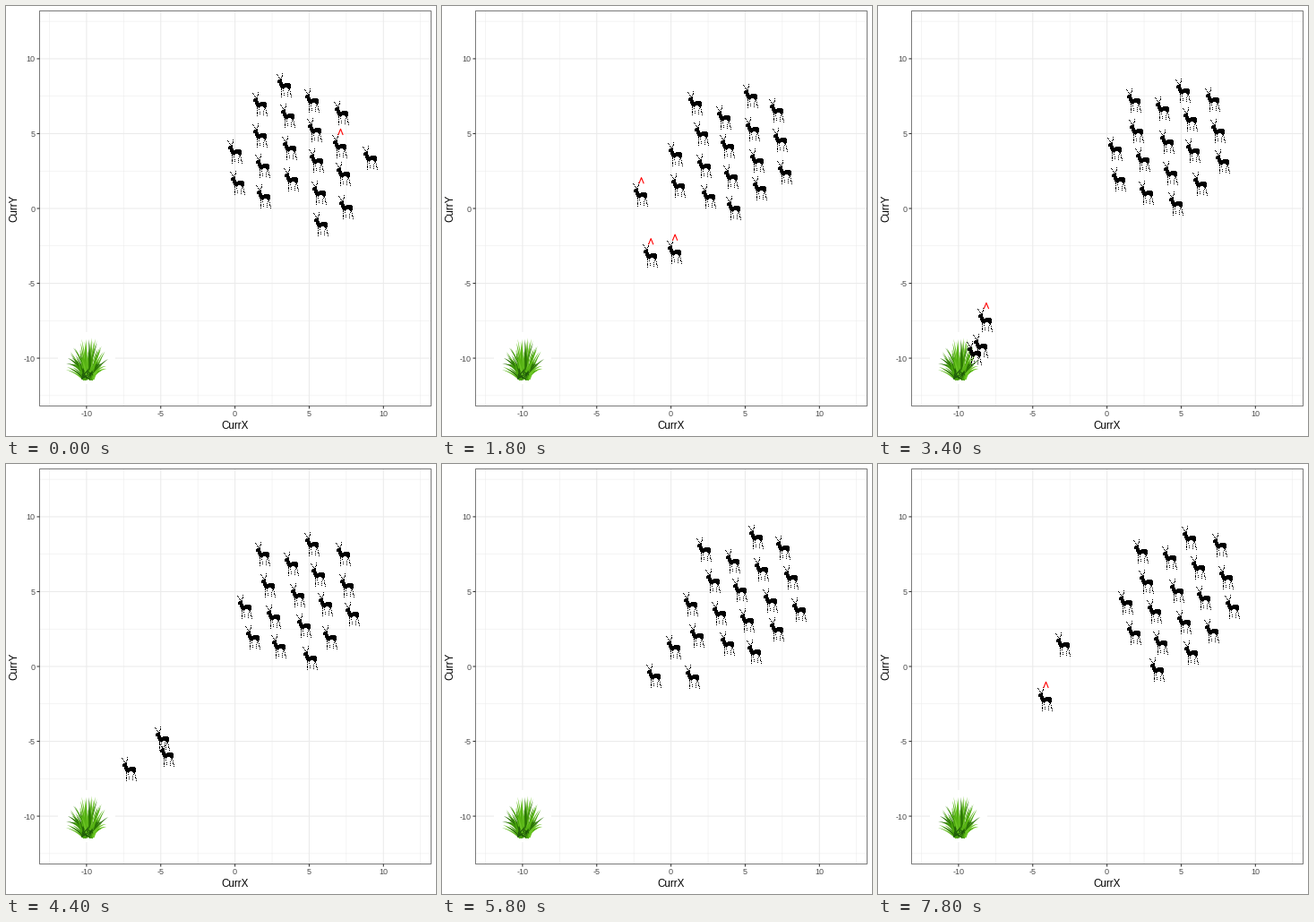
A matplotlib script for the animation above (8000 ms loop, 480 by 480 pixels).

```python
import numpy as np
import matplotlib.pyplot as plt
from matplotlib.animation import FuncAnimation
from matplotlib.collections import LineCollection, PolyCollection
from matplotlib.patches import Rectangle

SIZE, DPI = 480, 80
FRAMES, STEP = 40, 200
PT = 72 / DPI  # points per pixel

plt.rcParams["font.family"] = "Liberation Sans"
fig = plt.figure(figsize=(SIZE / DPI, SIZE / DPI), dpi=DPI, facecolor="white")
ax = fig.add_axes([0, 0, 1, 1])
ax.set_xlim(0, SIZE)
ax.set_ylim(SIZE, 0)
ax.axis("off")

LEFT, TOP, RIGHT, BOTTOM = 37.5, 5.5, 474.5, 446.5


def px(v):
    return 255.6 + 16.57 * v


def py(v):
    return 226.0 - 16.71 * v


def line(x, y, color, width, z):
    ax.plot(x, y, color=color, lw=width * PT, zorder=z,
            solid_capstyle="butt", snap=False)


def label(x, y, text, size, color, **kw):
    ax.text(x, y, text, fontsize=size * PT, color=color, **kw)


def draw_plot():
    for v in np.arange(-12.5, 13, 2.5):
        major = v % 5 == 0
        width = 1.07 if major else 0.53
        line([px(v)] * 2, [TOP, BOTTOM], "#ebebeb", width, 1)
        line([LEFT, RIGHT], [py(v)] * 2, "#ebebeb", width, 1)
        if major:
            line([px(v)] * 2, [BOTTOM, BOTTOM + 3], "#333333", 1.07, 2)
            line([LEFT - 3, LEFT], [py(v)] * 2, "#333333", 1.07, 2)
            label(px(v), 456, f"{v:.0f}", 9, "#4d4d4d",
                  ha="center", va="center")
            label(32.5, py(v), f"{v:.0f}", 9, "#4d4d4d",
                  ha="right", va="center_baseline")
    ax.add_patch(Rectangle((LEFT, TOP), RIGHT - LEFT, BOTTOM - TOP, fill=False,
                           ec="#333333", lw=0.65 * PT, zorder=8, snap=False))
    label(255.8, 472, "CurrX", 11.6, "black", ha="center", va="baseline")
    label(9.5, 226, "CurrY", 11.6, "black", ha="center", va="center",
          rotation=90)


def blade(base, tip, droop, width):
    """Tapered curved leaf as a polygon."""
    base, tip = np.array(base), np.array(tip)
    mid = (base + tip) / 2 + [0, -droop]
    t = np.linspace(0, 1, 9)[:, None]
    curve = (1 - t) ** 2 * base + 2 * t * (1 - t) * mid + t ** 2 * tip
    d = np.gradient(curve, axis=0)
    side = np.c_[-d[:, 1], d[:, 0]] / np.hypot(d[:, 0], d[:, 1])[:, None]
    half = side * width / 2 * (1 - t ** 2)
    return np.r_[curve + half, (curve - half)[::-1]]


def draw_grass():
    rng = np.random.default_rng(4)
    greens = ["#2a7306", "#3d9409", "#4aa80c", "#58b414", "#6cc624"]
    ax.add_patch(Rectangle((58, 364), 64, 58, fc="white", lw=0, zorder=2))
    leaves = []
    for a in np.linspace(-1.5, 1.5, 70):
        reach = rng.uniform(0.45, 1)
        base = (91 + 4 * np.sin(a) + rng.uniform(-3, 3), rng.uniform(407, 418))
        tip = (91 + 25 * reach * np.sin(a), 409 - 41 * reach * np.cos(a))
        leaves.append(blade(base, tip, 4, rng.uniform(1.4, 2.5)))
    rng.shuffle(leaves)
    ax.add_collection(PolyCollection(
        leaves, facecolors=rng.choice(greens, len(leaves)), lw=0, zorder=3))
    roots = [blade((91 + rng.uniform(-7, 7), rng.uniform(411, 417)),
                   (91 + rng.uniform(-8, 8), rng.uniform(403, 411)), 0, 1.4)
             for _ in range(10)]
    ax.add_collection(PolyCollection(roots, facecolors="#1f5a0a", lw=0,
                                     zorder=3))


def stroke(x0, y0, x1, y1, w):
    a, b = np.array([x0, y0], float), np.array([x1, y1], float)
    d = (b - a) / np.hypot(*(b - a))
    n = np.array([-d[1], d[0]]) * w / 2
    return np.array([a + n, b + n, b - n, a - n])


def dots(x0, y0, x1, y1, n):
    """Row of single-pixel squares, for thin speckled limbs."""
    unit = np.array([(0, 0), (1, 0), (1, 1), (0, 1)])
    return [unit + np.round(p)
            for p in np.linspace((x0, y0), (x1, y1), n)]


ANTELOPE = [
    np.array([(-4, -2), (0, -1.5), (5, -3), (7.5, -1), (7, 2.5), (5, 2.5),
              (3, 1.2), (-1.5, 2.5), (-4, 1.5)]),
    stroke(-4, -6, -2.5, 0, 2.6),
    stroke(-6.5, -4.5, -3, -6.3, 2),
    *dots(-4, -8, -8, -13, 5), *dots(-3, -8, -2, -14, 5),
    *dots(-3, 3, -3, 12, 7), *dots(-1, 3, 0, 10, 4),
    *dots(5, 3, 4, 11, 5), *dots(6, 3, 8, 12, 7),
]
CARET = np.array([(-2.7, 3.5), (0, -3.2), (2.7, 3.5)])


def path(now, points):
    t, x, y = zip(*points)
    return np.array([np.interp(now, t, x), np.interp(now, t, y)])


# The herd keeps a slanted grid: column -> range of rows.
COLUMNS = {-2: (1, 3), -1: (-1, 3), 0: (-1, 3), 1: (-2, 2), 2: (-2, 1)}
CELLS = [(c, r) for c, span in COLUMNS.items() for r in range(*span)]
GAP_FILLERS = {(2, -1), (1, 1), (0, 2)}  # close up when the walkers leave
CENTRE = [(0, 316, 160), (1000, 321, 163), (2600, 319, 155),
          (4400, 325, 148), (5800, 334, 143), (7800, 333, 142)]
PHASE = np.random.default_rng(1).uniform(0, 2 * np.pi, (len(CELLS), 2))


def herd_spots(now):
    skew = min(now / 5800, 1)
    down = np.array([2 + 6 * skew, 34.5])
    across = np.array([31 + skew, 15 - 5 * skew])
    centre = path(now, CENTRE)
    for (c, r), phase in zip(CELLS, PHASE):
        if (c, r) in GAP_FILLERS:
            c += max(0, 1 - now / 1000)
        sway = 1.5 * np.sin(2 * np.pi * now / 4000 + phase)
        yield centre + c * across + r * down + sway


# Walkers leave, turn at the grass and come back: (time, x, y).
WALKERS = [
    [(400, 311, 90), (3800, 95, 387), (5800, 237, 238), (7800, 207, 203)],
    [(0, 373, 158), (3400, 108, 389), (5800, 280, 239), (7800, 312, 231)],
    [(800, 350, 210), (3400, 115, 381), (5800, 259, 206), (7000, 244, 196),
     (7800, 187, 264)],
]


def is_hungry(now, points):
    """Marked on the way out, and on any second trip after coming home."""
    out = points[0][0] <= now < points[1][0]
    again = len(points) > 4 and now >= points[3][0]
    return out or again


draw_plot()
draw_grass()
bodies = PolyCollection([], facecolors="black", lw=0, antialiased=False,
                        zorder=5)
marks = LineCollection([], colors="#ff0000", lw=1.1 * PT, zorder=6)
ax.add_collection(bodies, autolim=False)
ax.add_collection(marks, autolim=False)


def update(i):
    now = i * STEP
    walkers = [path(now, w) for w in WALKERS]
    spots = np.round([*herd_spots(now), *walkers]) - [1, 1]
    bodies.set_verts([part + s for s in spots for part in ANTELOPE])
    marks.set_segments([CARET + p + [0.5, -17.5]
                        for p, w in zip(walkers, WALKERS)
                        if is_hungry(now, w)])
    return bodies, marks


anim = FuncAnimation(fig, update, frames=FRAMES, interval=STEP, repeat=True,
                     repeat_delay=0, init_func=lambda: update(0), blit=False)
plt.show()
```
